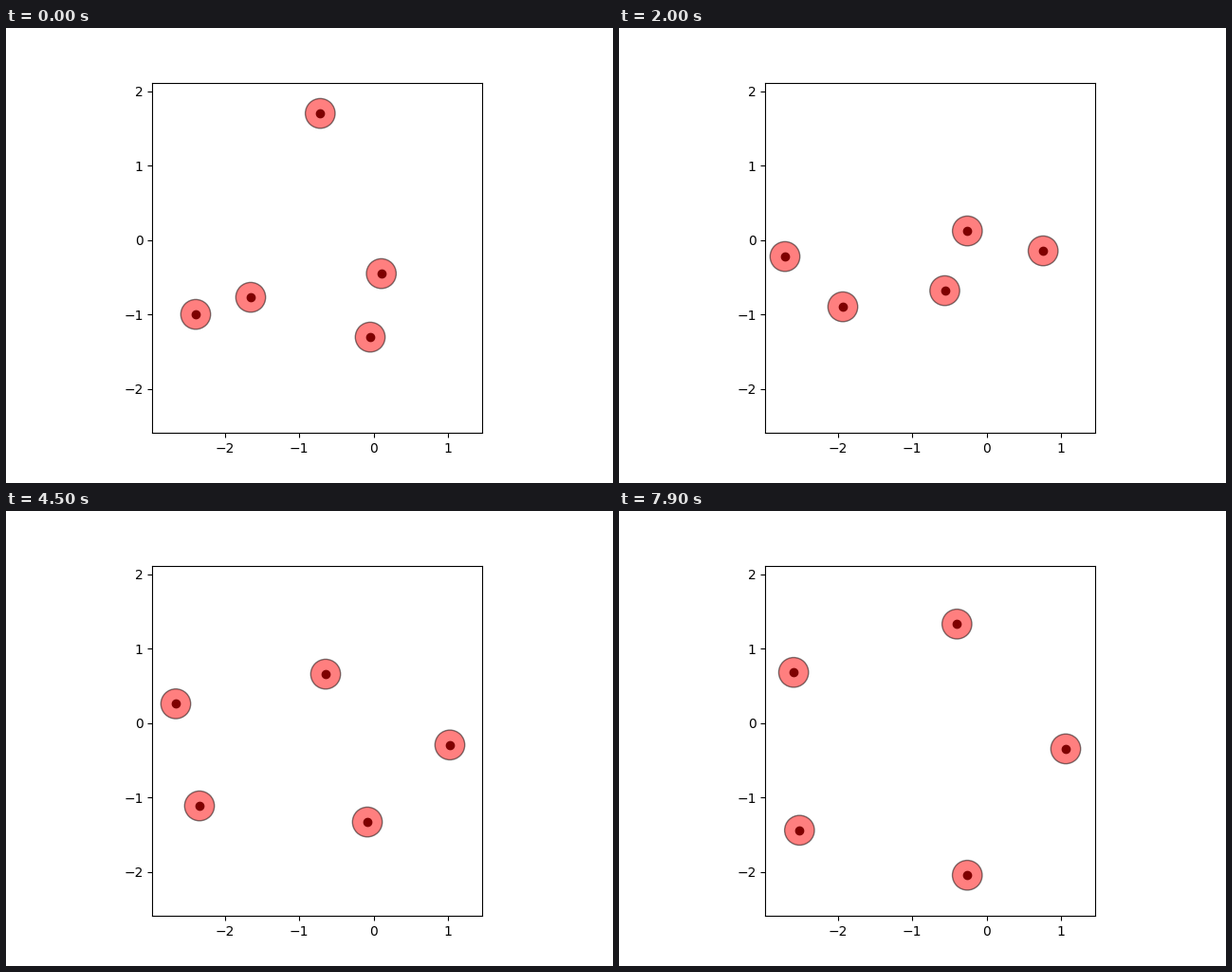
These frames come from a looping animation (640 px wide and 480 px high, 8000 ms). A matplotlib script:

```python
import numpy as np
import matplotlib.pyplot as plt
from matplotlib.animation import FuncAnimation
from matplotlib.patches import Circle

FRAMES, STEP = 80, 100
UNIT = 78.5                          # pixels per data unit
ORIGIN = np.array([387.75, 223.8])
CENTRE = np.array([313.8, 252.2])    # centre of mass, never moves
REACH, DECAY = 158.2, 0.41           # pentagon radius, settling rate

# Four agents jostle past each other through these points (pixels);
# the fifth balances them around the centre of mass.
TIMES = np.array([0, 0.6, 1, 2, 3, 4.5])
ANGLES = np.radians([-72, 72, -144, 144])
KEYS = np.array([
    [(331.3, 90), (343.3, 175), (350.5, 204.5), (367.3, 214), (385, 251), (381, 328)],
    [(384, 326), (364.3, 289), (354, 275), (343.5, 277), (315, 243), (337, 172)],
    [(258, 284), (260, 275), (255, 277), (236, 294), (219, 297), (204, 311)],
    [(200, 302), (181, 288), (177, 271), (175, 241), (178, 227), (179, 203.3)],
]).swapaxes(0, 1)
GOALS = CENTRE + REACH * np.column_stack([np.cos(ANGLES), -np.sin(ANGLES)])


def tangents():
    """Slopes without overshoot that lead smoothly into the settling."""
    s = np.diff(KEYS, axis=0) / np.diff(TIMES)[:, None, None]
    a, b = s[:-1], s[1:]
    same = a * b > 0
    inner = np.where(same, 2 * a * b / np.where(same, a + b, 1), 0)
    return np.concatenate([s[:1], inner, [DECAY * (GOALS - KEYS[-1])]])


SLOPES = tangents()


def jostle(t):
    i = np.searchsorted(TIMES, t, side="right") - 1
    h = TIMES[i + 1] - TIMES[i]
    u = (t - TIMES[i]) / h
    return ((1 + 2 * u) * (1 - u) ** 2 * KEYS[i]
            + u * (1 - u) ** 2 * h * SLOPES[i]
            + u * u * (3 - 2 * u) * KEYS[i + 1]
            + u * u * (u - 1) * h * SLOPES[i + 1])


def settle(t):
    return GOALS + (KEYS[-1] - GOALS) * np.exp(-DECAY * (t - TIMES[-1]))


def positions(t):
    four = jostle(t) if t < TIMES[-1] else settle(t)
    fifth = 5 * CENTRE - four.sum(axis=0)
    return (np.vstack([four, fifth]) - ORIGIN) / UNIT * (1, -1)


fig, ax = plt.subplots(figsize=(6.4, 4.8), dpi=100)
ax.set_aspect("equal")
dots, = ax.plot([], [], "ko", zorder=0.5)
discs = [ax.add_patch(Circle((0, 0), 0.2, fc="red", ec="black", alpha=0.5))
         for _ in range(5)]
ax.set_xlim(-2.9739, 1.4516)
ax.set_ylim(-2.5898, 2.1185)
ax.set_xticks(range(-2, 2))
ax.set_yticks(range(-2, 3))


def update(frame):
    points = positions(frame * STEP / 1000)
    dots.set_data(*points.T)
    for disc, point in zip(discs, points):
        disc.center = point
    return [dots, *discs]


anim = FuncAnimation(fig, update, frames=FRAMES, interval=STEP,
                     repeat=True, repeat_delay=0)
plt.show()
```
